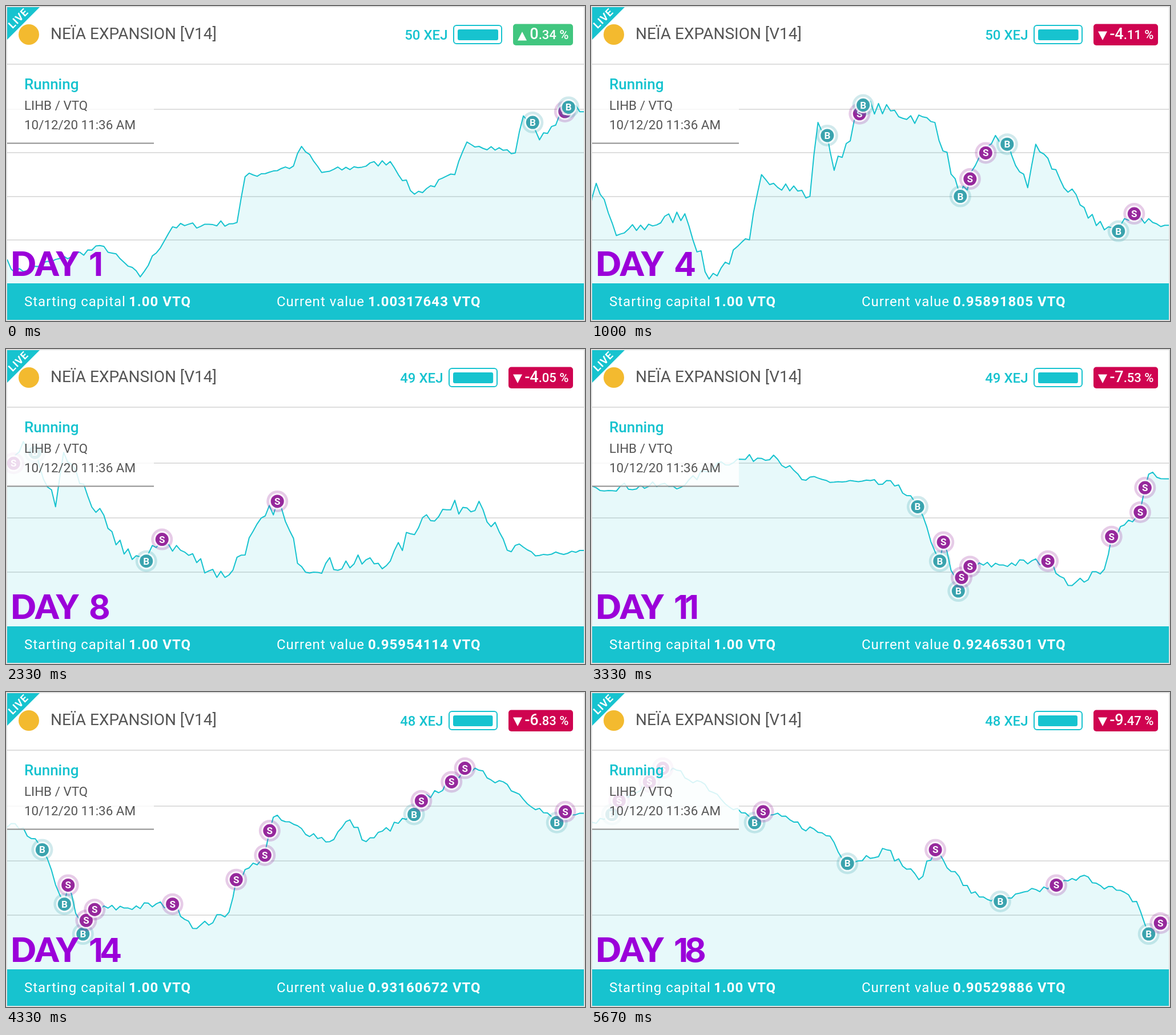
These frames come from a looping animation (1014x552 px, 6.01 s). An HTML page:

```html
<!DOCTYPE html>
<html lang="en">
<head>
<meta charset="utf-8">
<title>Trading bot recap</title>
<style>
  html, body { margin: 0; width: 100%; height: 100%; overflow: hidden; background: #fff; }
  svg { display: block; width: 1014px; height: 552px; font-family: Roboto, sans-serif; }
  .teal { fill: #17c3cf; }
  .info { fill: #555; font-size: 22.4px; }
  .medium { font-weight: 500; }
  .foot { fill: #fff; font-size: 24px; letter-spacing: 1px; }
  .strong { font-weight: 700; }
  .day { fill: #9b00d9; }
  .rule { stroke: #dedede; stroke-width: 2; }
  .mark text { fill: #fff; font-size: 17px; font-weight: 700; text-anchor: middle; }
</style>
</head>
<body>
<svg viewBox="0 0 1014 552">
  <defs>
    <clipPath id="plot"><rect x="2" y="103" width="1010" height="383"/></clipPath>
    <clipPath id="marks"><rect x="2" y="103" width="1011" height="383"/></clipPath>
  </defs>
  <rect width="1014" height="552" fill="#fff"/>
  <rect class="rule" x="1" y="1" width="1012" height="550" fill="none"/>
  <path class="rule" d="M2 102H1012"/>

  <g id="grid"></g>
  <g clip-path="url(#plot)">
    <path id="area" fill="#17c3cf" fill-opacity=".1"/>
    <path id="curve" fill="none" stroke="#17c3cf" stroke-width="2" stroke-linejoin="round"/>
  </g>
  <g id="trades" clip-path="url(#marks)"></g>

  <rect x="2" y="103" width="257" height="137" fill="#fff" fill-opacity=".83"/>
  <path d="M2 240.5H259" stroke="#8e8e8e" stroke-width="2"/>
  <text class="teal medium" x="32" y="146" font-size="26">Running</text>
  <text class="info" x="32" y="182">LIHB / VTQ</text>
  <text class="info" x="32" y="216">10/12/20 11:36 AM</text>

  <path class="teal" d="M2 2H59L2 59Z"/>
  <circle cx="40" cy="50" r="18" fill="#f3ba2f"/>
  <text transform="translate(26 26) rotate(-45)" text-anchor="middle" fill="#fff"
    font-size="18" font-weight="700" letter-spacing="1">LIVE</text>
  <text x="78" y="58" font-size="28" fill="#555">NEÏA EXPANSION [V14]</text>

  <g id="power">
    <text id="credit" class="teal medium" x="773.5" y="59" font-size="24" text-anchor="end"></text>
    <rect x="784" y="34" width="84" height="32" rx="5" fill="#fff" stroke="#17c3cf" stroke-width="2"/>
    <rect id="charge" class="teal" x="791" y="41" height="19" rx="3"/>
  </g>
  <rect id="badge" y="31.5" height="37.5" rx="5"/>
  <path id="arrow" fill="#fff"/>
  <text class="medium" x="985.5" y="58" fill="#fff" text-anchor="end"><tspan id="whole" font-size="27"></tspan><tspan id="cents" font-size="22"></tspan></text>

  <rect class="teal" x="2" y="486" width="1010" height="64"/>
  <text class="foot" x="32" y="526">Starting capital</text>
  <text class="foot strong" x="215" y="526">1.00 VTQ</text>
  <text class="foot" x="474" y="526">Current value</text>
  <text class="foot strong" id="value" x="634" y="526"></text>

  <text class="day" x="8" y="473" font-family="Lato, sans-serif" font-weight="900" font-size="58.5">DAY</text>
  <text class="day" id="num" x="145" y="473" font-family="Inter, sans-serif" font-weight="700" font-size="58" letter-spacing="-6"></text>
</svg>
<script>
const $ = id => document.getElementById(id);
const LOOP = 6010, DAYS = 18, PER_DAY = 24, SPAN = 143;
const LEFT = 2, RIGHT = 1012, BASE = 486, HEIGHT = 381;

// key prices: [sample, price, trade made there: B buys, S sells]
const keys = [
  [0, -2.9], [2, -3.5], [24, -2.3], [33, -3.7], [41, -1.4], [57, -1.2], [59, .9], [71, 1.4],
  [73, 2.3], [78, 1.1], [95, 1.6], [101, .1], [111, 1], [114, 2.5], [126, 2], [128, 3.7],
  [130.3, 3.4, 'B'], [132, 2.6], [138.3, 3.9, 'S'], [139.2, 4.1, 'B'], [157, 3.7],
  [163.3, 2, 'B'], [165.7, 2.4, 'S'], [169.6, 3, 'S'], [172, 3.4], [174.9, 3.2, 'B'],
  [180, 2.2], [182, 3.2], [195, 1.5], [202.5, 1.2, 'B'], [206.4, 1.6, 'S'], [222, .9],
  [235, 2.3, 'S'], [241, 1.1], [263, 1.2], [271, 2], [285, 2.3], [292, 1.4], [316, 1.2],
  [320.7, .4, 'B'], [326.2, -1.6, 'B'], [327.1, -.9, 'S'], [330.8, -2.7, 'B'],
  [331.6, -2.2, 'S'], [333.7, -1.8, 'S'], [353, -1.6, 'S'], [359, -2.5], [367, -1.9],
  [368.8, -.7, 'S'], [375.9, .2, 'S'], [377.1, 1.1, 'S'], [378, 1.6], [392, .7], [397, 1.5],
  [401, .7], [412.9, 1.7, 'B'], [414.7, 2.2, 'S'], [422.2, 2.9, 'S'], [425.5, 3.4, 'S'],
  [435, 2.9], [448.3, 1.4, 'B'], [450.4, 1.8, 'S'], [467, .9], [471.3, -.1, 'B'], [481, .4],
  [489, -.7], [493.1, .4, 'S'], [502, -1.2], [509.2, -1.5, 'B'], [523.1, -.9, 'S'], [531, -.6],
  [543, -1.5], [546, -2.7, 'B'], [548.9, -2.3, 'S']
];

// account readings: [day, value, change in percent]
const account = [
  [1, 1.00317643, .34], [4, .95891805, -4.11], [8, .95954114, -4.05], [11, .92465301, -7.53],
  [13, .93731844, -6.27], [16, .92018327, -7.96], [18, .90529886, -9.47]
];

let seed = 7;
function random() {
  seed = seed * 16807 % 2147483647;
  return seed / 2147483647;
}

// straight line through the rows, read in the given column
function between(rows, at, col) {
  const i = Math.max(1, rows.findIndex(r => r[0] >= at));
  const a = rows[i - 1], b = rows[i];
  return a[col] + (b[col] - a[col]) * (at - a[0]) / (b[0] - a[0]);
}

// one jittered sample per step between the keys
const prices = [];
keys.forEach(([k, v], i) => {
  prices.push([k, v]);
  const end = i + 1 < keys.length ? keys[i + 1][0] : k;
  for (let s = Math.floor(k) + 1; s < end - .5; s++)
    prices.push([s, between(keys, s, 1) + .3 * (random() - .5)]);
});

// whole grid steps that hold all visible prices
function axis(values) {
  const min = Math.min(...values), max = Math.max(...values);
  const step = max - min > 4.5 ? 2 : 1;
  const low = Math.floor(min / step) * step;
  return { low, n: Math.ceil((max - low) / step), step };
}

function marker(kind, x, y) {
  const color = kind === 'B' ? '#3aa3ae' : '#96289c';
  return `<g class="mark" transform="translate(${x.toFixed(1)} ${y.toFixed(1)})">
    <circle r="19" fill="${color}" fill-opacity=".24"/>
    <circle r="14.5" fill="#fff" fill-opacity=".8"/>
    <circle r="11.5" fill="${color}"/><text y="6">${kind}</text></g>`;
}

function drawChart(d) {
  const from = (d - 1) * PER_DAY;
  const inside = ([k]) => k >= from && k < from + SPAN;
  const { low, n, step } = axis(prices.filter(inside).map(p => p[1]));
  const toX = k => LEFT + (k - from) * (RIGHT - LEFT) / SPAN;
  const toY = v => BASE - (v - low) / (step * n) * HEIGHT;

  let grid = '';
  for (let i = 1; i < n; i++)
    grid += `<path class="rule" d="M2 ${Math.round(BASE - HEIGHT * i / n)}H1012"/>`;
  $('grid').innerHTML = grid;

  // the newest price is held up to the right edge
  const pts = prices.filter(([k]) => k > from - PER_DAY && k < from + SPAN)
    .map(([k, v]) => [toX(k), toY(v)]);
  pts.push([RIGHT, pts[pts.length - 1][1]]);
  const line = 'M' + pts.map(p => p.map(c => c.toFixed(1)).join(' ')).join('L');
  $('curve').setAttribute('d', line);
  $('area').setAttribute('d', `${line}V${BASE}H${pts[0][0].toFixed(1)}Z`);

  $('trades').innerHTML = keys.filter(k => k[2] && inside(k))
    .map(([k, v, kind]) => marker(kind, toX(k), toY(v))).join('');
}

function drawStats(d) {
  const pct = between(account, d, 2), up = pct > 0, x = up ? 888 : 880;
  const [whole, cents] = pct.toFixed(2).split('.');
  $('power').setAttribute('transform', `translate(${x - 888} 0)`);
  $('credit').textContent = Math.round(50.4 - .14 * d) + ' XEJ';
  $('charge').setAttribute('width', 71 - .12 * (d - 1));
  $('badge').setAttribute('x', x);
  $('badge').setAttribute('width', 993 - x);
  $('badge').setAttribute('fill', up ? '#41c67f' : '#cf0350');
  $('arrow').setAttribute('d', up ? 'M896 60.5H912L904 45Z' : 'M888 44.5H904L896 60Z');
  $('whole').textContent = whole;
  $('cents').textContent = `.${cents} %`;
  $('value').textContent = between(account, d, 1).toFixed(8) + ' VTQ';
  $('num').textContent = d;
}

// days change every third of a second, on whole hundredths
const starts = Array.from({ length: DAYS }, (_, i) => Math.round(i * 100 / 3) * 10);
let shown = 0;

function tick() {
  const t = performance.now() % LOOP;
  const d = starts.filter(s => s <= t).length;
  if (d !== shown) {
    shown = d;
    drawChart(d);
    drawStats(d);
  }
  requestAnimationFrame(tick);
}
tick();
</script>
</body>
</html>
```
